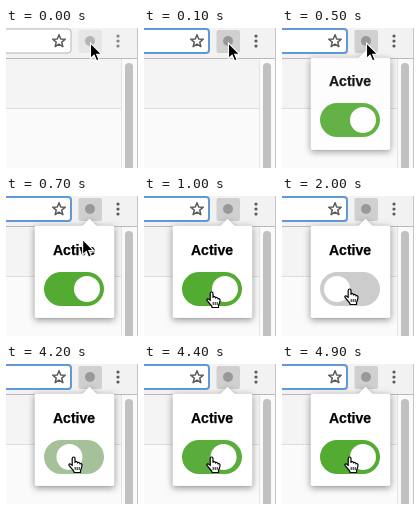
An HTML page for the animation above (5.1 s loop, 132x140 px).

```html
<!DOCTYPE html>
<html lang="en">
<head>
<meta charset="utf-8">
<title>Toggle popup</title>
<style>
  html, body { margin: 0; width: 100%; height: 100%; overflow: hidden; background: #fafafa; }
  svg { display: block; width: 132px; height: 140px; }
  #card { filter: drop-shadow(0 2px 3.5px rgba(0, 0, 0, .4)); }
  text { font: bold 14px "Liberation Sans", Arial, sans-serif; text-anchor: middle; }
</style>
</head>
<body>
<svg viewBox="0 0 132 140">
  <!-- page -->
  <rect width="132" height="140" fill="#fafafa"/>
  <rect y="31" width="115" height="49" fill="#f4f4f4"/>
  <rect y="80" width="115" height="1" fill="#dedede"/>
  <rect x="115" y="31" width="1" height="109" fill="#e4e4e4"/>
  <rect x="119" y="35" width="8" height="120" rx="4" fill="#c1c1c1"/>

  <!-- toolbar -->
  <rect width="132" height="30" fill="#f2f2f2"/>
  <rect y="30" width="132" height="1" fill="#b9b9b9"/>
  <rect x="131" width="1" height="140" fill="#c4c4c4"/>
  <rect id="address" x="-10" y="1" width="75" height="24" rx="3" fill="#fff"/>
  <path id="star" fill="none" stroke="#5a5a5a" stroke-width="1.5" stroke-linejoin="round"/>
  <rect id="button" x="72.5" y="2" width="23.5" height="23" rx="2"/>
  <circle id="icon" cx="84" cy="13" r="5"/>
  <g id="menu">
    <circle cx="112" cy="8" r="1.6"/><circle cx="112" cy="13" r="1.6"/><circle cx="112" cy="18" r="1.6"/>
  </g>

  <!-- popup -->
  <g id="popup">
    <path id="card" d="M30 29.5H76.5L83.5 22.5 90.5 29.5H107Q108.5 29.5 108.5 31V120.5Q108.5 122 107 122H30Q28.5 122 28.5 120.5V31Q28.5 29.5 30 29.5Z" fill="#fff" stroke="#000" stroke-opacity=".1" stroke-width=".6"/>
    <g id="content">
      <text x="68" y="59" stroke="#000" stroke-width=".25">Active</text>
      <rect id="track" x="38" y="76" width="60" height="34" rx="17"/>
      <circle id="knob" cy="93" r="13" fill="#fff"/>
    </g>
  </g>

  <!-- pointers -->
  <path id="arrow" d="M0 0V15.5L3.6 12.2 6 17.8 8.6 16.7 6.2 11.2H11Z" stroke="#fff" stroke-width="1.1"/>
  <g id="hand" fill="#fff" stroke="#000" stroke-width="1.2" stroke-linejoin="round">
    <path d="M4 2Q4 .5 5.4 .5 6.8 .5 6.8 2V6Q7 5 8.2 5.2 9.4 5.4 9.4 6.6 9.8 5.8 10.8 6 11.8 6.3 11.8 7.4 12.4 6.9 13.2 7.3 14 7.8 13.8 9L13.3 11.5Q12.6 13 12.3 14V16H6Q5.6 14.4 4.2 13L1 9.2Q.2 8 1.2 7.4 2.4 7 4 9Z"/>
    <path d="M7 10.5V13.5M9 10.5V13.5M11 10.5V13.5" stroke-width=".9"/>
  </g>
</svg>
<script>
const LOOP = 5100, STEP = 100;
const GREEN = [84, 171, 50], GRAY = [204, 204, 204];
const $ = id => document.getElementById(id);
const set = (id, attrs) => Object.entries(attrs).forEach(([k, v]) => $(id).setAttribute(k, v));
const clamp = x => Math.min(1, Math.max(0, x));
const mix = (a, b, p) => a + (b - a) * p;

// CSS "ease": cubic-bezier(.25, .1, .25, 1)
function ease(x) {
  if (x <= 0 || x >= 1) return clamp(x);
  let lo = 0, hi = 1, u = .5;
  for (let i = 0; i < 24; i++) {
    u = (lo + hi) / 2;
    if (.75 * u * (1 - u) + u ** 3 < x) lo = u; else hi = u;
  }
  return .3 * u * (1 - u) ** 2 + 3 * u * u * (1 - u) + u ** 3;
}

// Toggle transition of 400 ms, already `lead` ms in when it is first seen
const transition = (t, first, lead) => t < first ? 0 : ease((t - first + lead) / 400);

function pointer(t) {
  if (t >= 1400) return [62.2, 92.5];
  if (t >= 1300) return [62.2, 89];
  const p = clamp((t - 500) / 500), s = p * p * (3 - 2 * p);
  return [mix(84.5, 62.2, s), mix(15, 95.5, s)];
}

function draw(time) {
  const t = Math.floor(time % LOOP / STEP) * STEP;
  const focused = t >= 100, opening = t < 600;
  set('address', { stroke: focused ? '#6199d8' : '#b3b3b3', 'stroke-width': focused ? 2 : 1 });
  set('button', { fill: focused ? '#d0d0d0' : '#e6e6e6' });
  set('icon', { fill: focused ? '#999' : '#b4b4b4' });
  set('menu', { fill: focused ? '#5a5a5a' : '#858585' });
  set('popup', { opacity: t < 500 ? 0 : opening ? .9 : 1 });
  set('content', { transform: `translate(0 ${opening ? -1 : 0})` });

  const on = 1 - transition(t, 1700, 140) + transition(t, 4200, 85);
  set('track', { fill: `rgb(${GRAY.map((c, i) => Math.round(mix(c, GREEN[i], on)))})` });
  set('knob', { cx: 55 + 26 * on });

  const [x, y] = pointer(t), hovering = y > 76;
  const transform = `translate(${x} ${y})`;
  set('arrow', { transform, visibility: hovering ? 'hidden' : 'visible' });
  set('hand', { transform, visibility: hovering ? 'visible' : 'hidden' });
}

const starPoints = Array.from({ length: 10 }, (_, i) => {
  const r = i % 2 ? 2.9 : 6.6, a = (i / 5 - .5) * Math.PI;
  return `${53 + r * Math.cos(a)} ${13.3 + r * Math.sin(a)}`;
});
set('star', { d: `M${starPoints.join('L')}Z` });

const start = performance.now();
function tick() {
  draw(performance.now() - start);
  requestAnimationFrame(tick);
}
tick();
</script>
</body>
</html>
```
